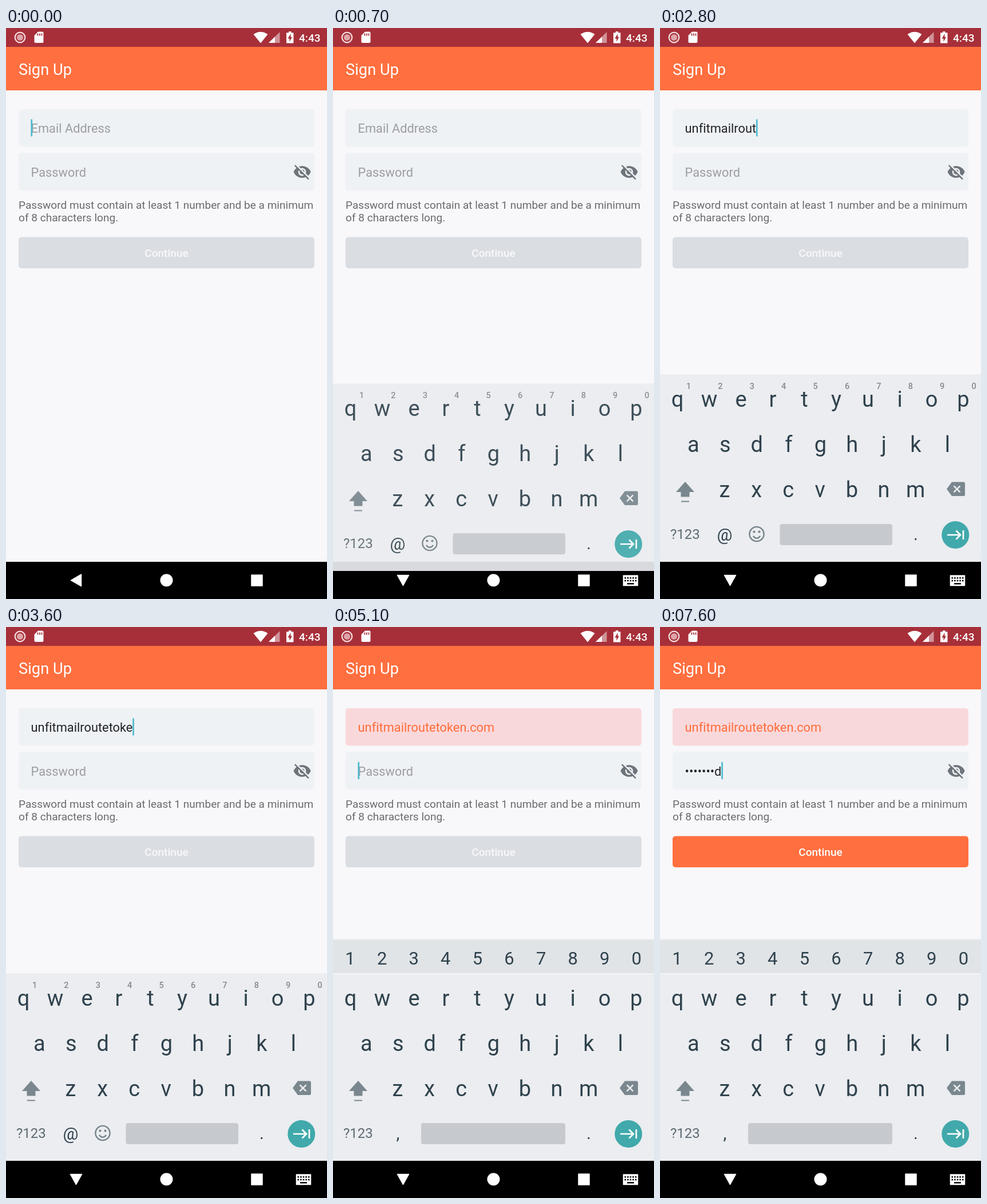
An HTML page for the animation above (8000 ms loop, 561 by 998 pixels).

```html
<!DOCTYPE html>
<html lang="en">
<head>
<meta charset="utf-8">
<title>Sign up form</title>
<style>
  html, body { margin: 0; width: 100%; height: 100%; overflow: hidden; background: #f8f7fa; }
  svg { display: block; width: 100%; height: 100%; }
  text { font-family: Roboto, sans-serif; font-size: 21.82px; font-variant-ligatures: none; }
  .small { font-size: 19.09px; }
  .medium { font-weight: 500; }
  .mid { text-anchor: middle; }
  .hint { fill: #9c9da1; }
  .key { font-size: 38px; fill: #2f424d; text-anchor: middle; }
  .digit { font-size: 31px; }
  .sign { font-size: 30px; }
  .mini { font-size: 14.5px; font-weight: 500; fill: #84898d; }
</style>
</head>
<body>
<svg viewBox="0 0 561 998">
  <rect width="561" height="998" fill="#f8f7fa"/>

  <!-- status bar -->
  <rect width="561" height="33" fill="#a72f39"/>
  <circle cx="24.5" cy="16.5" r="8.8" fill="none" stroke="#f5dfe1" stroke-width="2.2"/>
  <circle cx="24.5" cy="16.5" r="5.6" fill="#dda3a8"/>
  <path d="M56 6.500H63.500Q65.500 6.500 65.500 8.500V24Q65.500 26 63.500 26H51.500Q49.500 26 49.500 24V13Z" fill="#fff"/>
  <path d="M55.500 9.500v4M59 9.500v4M62.500 9.500v4" stroke="#a72f39" stroke-width="1.800"/>
  <path d="M432.500 11Q445 2.500 457.500 11L445 26.500Z" fill="#fff"/>
  <path d="M478.500 7V26H459Z" fill="#d09499"/>
  <path d="M470 15.300V26H459Z" fill="#fff"/>
  <path d="M494 6H498.500V8.300H502.500V26.500H490V8.300H494Z" fill="#fff"/>
  <path d="M497.500 10L492.500 18.500H495.500V24L500 15.700H497.500Z" fill="#a72f39"/>
  <text class="small medium" x="512" y="24" fill="#fff">4:43</text>

  <!-- app bar -->
  <rect y="33" width="561" height="76" fill="#ff6f3f"/>
  <text x="22" y="81.500" fill="#fff" style="font-size:27.27px">Sign Up</text>

  <!-- form -->
  <rect id="emailBox" x="22" y="142" width="517" height="65.500" rx="5"/>
  <rect x="22" y="218.500" width="517" height="65.500" rx="5" fill="#eff2f5"/>
  <text id="emailHint" class="hint" x="43.600" y="183">Email Address</text>
  <text id="email" x="43.600" y="183"></text>
  <text id="passHint" class="hint" x="43.600" y="259.500">Password</text>
  <text id="pass" x="43.600" y="259.500" fill="#212326"></text>
  <rect id="caret" width="2.700" height="30" fill="#4dbbd0"/>
  <g transform="translate(501.200 235.200) scale(1.364)">
    <path d="M1 12C2.700 7.600 7 4.500 12 4.500S21.300 7.600 23 12C21.300 16.400 17 19.500 12 19.500S2.700 16.400 1 12Z" fill="#6d747a"/>
    <circle cx="12" cy="12" r="5" fill="#eff2f5"/>
    <circle cx="12" cy="12" r="3" fill="#6d747a"/>
    <path d="M3.900 2.400L22 20.500" stroke="#eff2f5" stroke-width="1.800"/>
    <path d="M2.600 3.600L20.400 21.400" stroke="#6d747a" stroke-width="1.800"/>
  </g>
  <g fill="#6b6b6e">
    <text class="small" x="22" y="315.500">Password must contain at least 1 number and be a minimum</text>
    <text class="small" x="22" y="338">of 8 characters long.</text>
  </g>
  <rect id="button" x="22" y="365.500" width="517" height="54.500" rx="5"/>
  <text id="buttonText" class="small medium mid" x="280.500" y="400">Continue</text>

  <rect y="933" width="561" height="65" fill="#000"/>

  <!-- keyboard -->
  <g id="board">
    <g id="strip">
      <rect y="545" width="561" height="2" fill="#eeeff2"/>
      <rect y="547" width="561" height="59" fill="#e1e4e7"/>
    </g>
    <rect y="605.500" width="561" height="327.500" fill="#ebedf0"/>
    <rect id="stripLine" y="605.500" width="561" height="1.500" fill="#f7f8f9"/>
    <g id="keys"></g>
    <path d="M44 793L60 811H51.500V819.500H36.500V811H28Z" fill="#7a878e"/>
    <rect x="37" y="826.500" width="14" height="2" fill="#7a878e"/>
    <path d="M510 793.500H530.500Q533 793.500 533 796V815.500Q533 818 530.500 818H510L501 805.800Z" fill="#7a878e"/>
    <path d="M513.500 800.300L524.500 811.300M524.500 800.300L513.500 811.300" stroke="#ebedf0" stroke-width="2.500"/>
    <text x="18" y="893" fill="#5d6b72" style="font-size:24px">?123</text>
    <rect id="space" y="867" width="0" height="37" rx="4" fill="#c6c9ce"/>
    <text class="key sign" x="447" y="895">.</text>
    <g id="mailKeys">
      <text class="key sign" x="113" y="895.500">@</text>
      <g fill="none" stroke="#75828a" stroke-width="2.400">
        <circle cx="169" cy="884.500" r="12.600"/>
        <path d="M162.800 888Q169 895.500 175.200 888"/>
      </g>
      <g fill="#75828a">
        <circle cx="164.500" cy="880.500" r="2.100"/>
        <circle cx="173.500" cy="880.500" r="2.100"/>
      </g>
    </g>
    <text id="comma" class="key sign" x="113.500" y="895">,</text>
    <circle cx="516.300" cy="886" r="24" fill="#41a9ab"/>
    <path d="M502 886H525M517.500 878.500L525 886L517.500 893.500M530 878V894" fill="none" stroke="#fff" stroke-width="2.700"/>
  </g>

  <!-- navigation bar -->
  <g fill="#fff" stroke="#fff" stroke-width="1.500" stroke-linejoin="round">
    <path id="back" d="M113.500 965.300L131.500 955V975.600Z"/>
    <circle cx="280.500" cy="965.300" r="10.300"/>
    <rect x="429" y="956" width="19" height="19"/>
    <path id="down" d="M112.500 956.500H132.500L122.500 974.500Z"/>
    <g id="switcher">
      <rect x="507.500" y="957" width="25" height="17.500"/>
      <path d="M509.500 961.300H531M509.500 966H531" stroke="#000" stroke-width="2.600" stroke-dasharray="2.600 2"/>
      <path d="M514 971.300H526" stroke="#000" stroke-width="2.400"/>
    </g>
  </g>
</svg>
<script>
const LOOP = 8000;
const FOCUS_PASS = 5100;
const ADDRESS = "unfitmailroutetoken.com";
const SECRET = "password";
// [time, characters typed so far]
const ADDRESS_STEPS = [[1000, 1], [1200, 2], [1600, 5], [1700, 6], [1800, 7], [2000, 8],
  [2200, 9], [2300, 10], [2400, 12], [2800, 13], [3000, 14], [3100, 15], [3300, 16],
  [3400, 17], [3600, 18], [3700, 19], [4100, 20], [4300, 21], [4500, 23]];
const SECRET_TIMES = [6400, 6600, 6800, 6900, 7200, 7400, 7500, 7600];

const $ = id => document.getElementById(id);
const set = (id, attrs) => {
  for (const name in attrs) $(id).setAttribute(name, attrs[name]);
};
const show = (id, on) => set(id, { visibility: on ? "visible" : "hidden" });

function addRow(parent, chars, x, y, step, cls) {
  [...chars].forEach((char, i) => {
    const el = document.createElementNS($("keys").namespaceURI, "text");
    el.setAttribute("class", cls);
    el.setAttribute("x", x + i * step);
    el.setAttribute("y", y);
    el.textContent = char;
    $(parent).append(el);
  });
}
addRow("keys", "qwertyuiop", 30.5, 662, 55.5, "key");
addRow("keys", "asdfghjkl", 58.3, 740.5, 55.5, "key");
addRow("keys", "zxcvbnm", 113, 819.5, 55.6, "key");
addRow("mailKeys", "1234567890", 50, 631, 55.4, "mini mid");
addRow("strip", "1234567890", 30, 589.5, 55.6, "key digit");

function typedCount(time) {
  let count = 0;
  for (const [at, n] of ADDRESS_STEPS) if (time >= at) count = n;
  return count;
}

function maskedSecret(time) {
  const n = SECRET_TIMES.filter(at => time >= at).length;
  return n ? "•".repeat(n - 1) + SECRET[n - 1] : "";
}

function drawForm(time, onPass) {
  const address = ADDRESS.slice(0, typedCount(time));
  const secret = maskedSecret(time);
  $("email").textContent = address;
  $("pass").textContent = secret;
  show("emailHint", !address);
  show("passHint", !secret);
  set("email", { fill: onPass ? "#ff6c3a" : "#212326" });
  set("emailBox", { fill: onPass ? "#f9d8db" : "#eff2f5" });
  set("button", { fill: secret ? "#ff6f3f" : "#dadde2" });
  set("buttonText", { fill: secret ? "#fff" : "#f8f8fa" });

  const active = onPass ? "pass" : "email";
  const width = $(active).textContent ? $(active).getComputedTextLength() : 0;
  set("caret", { x: 43.4 + width, y: onPass ? 236 : 159.5 });
  const blinkOff = (time >= 500 && time < 1000) || (time >= 5500 && time < 6000);
  show("caret", !blinkOff);
}

function drawKeyboard(time, onPass) {
  // slides up in steps of 100 ms
  const step = Math.floor(time / 100) - 5;
  const alpha = step < 1 ? 0 : Math.min(1, 0.62 + (step - 1) * 0.3);
  const shift = step < 1 ? 62 : Math.round(62 * Math.max(0, 1 - (step - 1) / 2) ** 2);
  set("board", { opacity: alpha, transform: `translate(0 ${shift})` });
  set("space", onPass ? { x: 154, width: 252 } : { x: 209.5, width: 196.5 });
  show("strip", onPass);
  show("stripLine", onPass);
  show("comma", onPass);
  show("mailKeys", !onPass);
  show("back", step < 0);
  show("down", step >= 0);
  show("switcher", step >= 0);
}

function draw(time) {
  const onPass = time >= FOCUS_PASS;
  drawForm(time, onPass);
  drawKeyboard(time, onPass);
}

const start = performance.now();
function tick() {
  draw((performance.now() - start) % LOOP);
  requestAnimationFrame(tick);
}
tick();
</script>
</body>
</html>
```
